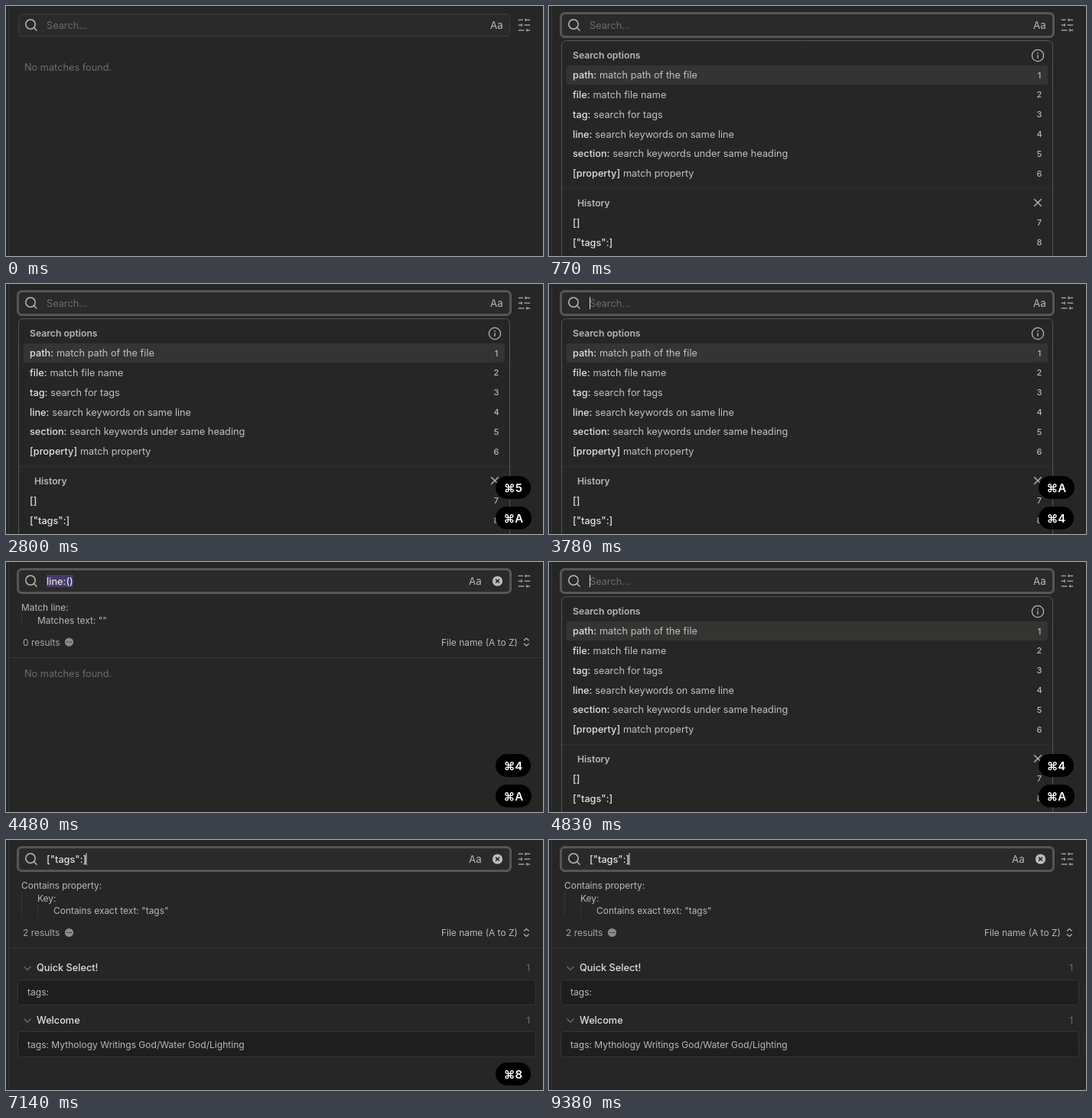
Recreate the animation shown at these times as an HTML page with a canvas. Size 702 by 328 pixels, loop 9730 ms.

```html
<!DOCTYPE html>
<html lang="en">
<head>
<meta charset="utf-8">
<title>Search panel</title>
<style>
  html, body { margin: 0; width: 100%; height: 100%; overflow: hidden; background: #262626; }
  canvas { display: block; }
</style>
</head>
<body>
<canvas id="stage" width="702" height="328"></canvas>
<script>
const ctx = document.getElementById('stage').getContext('2d');
const LOOP = 9730, TICK = 70, FADE = 185;
const BG = '#262626', LINE = '#363636', NORMAL = '#e0e0e0', MUTED = '#b8b8b8', FAINT = '#6c6c6c', RING = '#565656';
const BODY = 12.74, SMALL = 11.95;

const section = { text: 'section:()', caret: 106, explain: ['Match section:', 'Matches text: ""'] };
const line = { text: 'line:()', caret: 83, explain: ['Match line:', 'Matches text: ""'] };
const tags = {
  text: '["tags":]', caret: 105,
  explain: ['Contains property:', 'Key:', 'Contains exact text: "tags"'],
  hits: [['Quick Select!', 'tags:'], ['Welcome', 'tags: Mythology Writings God/Water God/Lighting']]
};

// at: start, menu: menu opens, clear: previous results vanish
const scenes = [
  { at: 0 },
  { at: 280, focus: true, menu: 350, blink: [770] },
  { at: 1330, focus: true, query: section, blink: [1820] },
  { at: 2030, focus: true, query: section, selected: true },
  { at: 2240, focus: true, menu: 2240, stale: section, clear: 2310, blink: [2800, 3290] },
  { at: 3850, focus: true, query: line, blink: [4340] },
  { at: 4480, focus: true, query: line, selected: true },
  { at: 4690, focus: true, menu: 4760, stale: line, clear: 4830, blink: [5250, 5740, 6300, 6790] },
  { at: 7140, focus: true, query: tags, blink: [7630, 8190, 8680, 9240] }
];

// label, time pressed, start of fade
const keys = [
  ['5', 1330, 3385], ['A', 1960, 4090], ['4', 3780, 5850], ['A', 4480, 6545], ['8', 7140, 9195]
];

const options = [
  ['path:', 'match path of the file'],
  ['file:', 'match file name'],
  ['tag:', 'search for tags'],
  ['line:', 'search keywords on same line'],
  ['section:', 'search keywords under same heading'],
  ['[property]', 'match property']
];

function setFont(size, weight) {
  ctx.font = `${weight} ${size}px Inter, "Noto Sans", sans-serif`;
}

function text(str, x, y, color = MUTED, size = BODY, weight = 400, align = 'left') {
  setFont(size, weight);
  ctx.textAlign = align;
  ctx.fillStyle = color;
  ctx.fillText(str, x, y);
  return ctx.measureText(str).width;
}

function strong(str, x, y) {
  return text(str, x, y, NORMAL, BODY, 500);
}

function box(x, y, w, h, r, fill, stroke, width = 1) {
  ctx.beginPath();
  ctx.roundRect(x, y, w, h, r);
  if (fill) { ctx.fillStyle = fill; ctx.fill(); }
  if (stroke) { ctx.strokeStyle = stroke; ctx.lineWidth = width; ctx.stroke(); }
}

function poly(color, width, ...points) {
  ctx.beginPath();
  for (let i = 0; i < points.length; i += 2) ctx.lineTo(points[i], points[i + 1]);
  ctx.strokeStyle = color;
  ctx.lineWidth = width;
  ctx.stroke();
}

function disc(x, y, r, fill, stroke, width) {
  box(x - r, y - r, 2 * r, 2 * r, r, fill, stroke, width);
}

function cross(x, y, r, color, width) {
  poly(color, width, x - r, y - r, x + r, y + r);
  poly(color, width, x + r, y - r, x - r, y + r);
}

function sliders() {
  const s = 0.85, ox = 667.3, oy = 14.8;
  const seg = (x1, y1, x2, y2) => poly(MUTED, 1.2, ox + x1 * s, oy + y1 * s, ox + x2 * s, oy + y2 * s);
  for (const [y, left, right, knob] of [[4, 10, 14, 14], [12, 8, 12, 8], [20, 12, 16, 16]]) {
    seg(3, y, left, y);
    seg(right, y, 21, y);
    seg(knob, y - 2, knob, y + 2);
  }
}

function searchBar(t, scene) {
  const { query } = scene;
  box(16.5, 10.5, 642, 29, 4, '#2a2a2a', '#3c3c3c');
  if (scene.focus) {
    ctx.globalAlpha = scene.at === 280 ? Math.min(1, 0.35 + (t - 280) / 200) : 1;
    box(15.5, 9.5, 644, 31, 5, null, RING, 3);
    ctx.globalAlpha = 1;
  }
  disc(32, 24, 6.2, null, MUTED, 1.5);
  poly(MUTED, 1.5, 36.5, 28.5, 40.5, 32.5);
  sliders();
  text('Aa', query ? 605 : 633, 30, MUTED, 13.3, 400);

  if (query) {
    if (scene.selected) {
      setFont(BODY, 500);
      ctx.fillStyle = '#463b68';
      ctx.fillRect(53, 17, ctx.measureText(query.text).width, 16);
    }
    strong(query.text, 53, 30);
    disc(642.5, 25, 6.6, '#bcbcbc');
    cross(642.5, 25, 2.4, '#2a2a2a', 1.5);
  } else {
    text('Search...', 53, 30, FAINT);
  }

  if (scene.blink && scene.blink.filter(b => b <= t).length % 2 === 0) {
    ctx.fillStyle = '#e0e0e0';
    ctx.fillRect((query ? query.caret : 53.5) - 0.5, 17, 1, 16);
  }
}

function results({ explain, hits = [] }) {
  const step = 16.5, shift = (explain.length - 2) * step;
  explain.forEach((str, i) => {
    text(str, 20 + 21 * i, 64 + step * i, MUTED, SMALL);
    if (i) poly(LINE, 1, 21 * i - 0.5, 51.5 + step * i, 21 * i - 0.5, 84 + shift);
  });

  text(`${hits.length} results`, 22, 109.5 + shift, '#a6a6a6', SMALL);
  const y = 105 + shift;
  disc(82.5, y, 5.6, '#8c8c8c');
  for (const dx of [-2.7, 0, 2.7]) disc(82.5 + dx, y, 0.8, BG);
  text('File name (A to Z)', 569, 109.5 + shift, MUTED, SMALL);
  poly(MUTED, 1.2, 677, y - 2, 680.3, y - 5, 683.6, y - 2);
  poly(MUTED, 1.2, 677, y + 2, 680.3, y + 5, 683.6, y + 2);
  const rule = Math.floor(125 + shift) + 0.5;
  poly(LINE, 1, 4, rule, 702, rule);

  if (!hits.length) text('No matches found.', 24, 151, FAINT);
  hits.forEach(([title, match], i) => {
    const top = 168 + 68.5 * i;
    poly(FAINT, 1.4, 23.5, top - 2, 28, top + 2.5, 32.5, top - 2);
    strong(title, 40, top + 4.2);
    text('1', 685, top + 4, FAINT, SMALL, 400, 'right');
    box(15.5, Math.floor(top + 15) + 0.5, 677, 33, 4, '#1e1e1e', LINE);
    text(match, 28, top + 36.3, MUTED, 12.05);
  });
}

function menu() {
  box(16.5, 45.5, 642, 300, 6, BG, RING);
  text('Search options', 31, 69, MUTED, 12.2, 600);
  disc(639, 65, 7.6, null, MUTED, 1.3);
  poly(MUTED, 1.4, 639, 64.3, 639, 68.8);
  disc(639, 61.8, 0.9, MUTED);

  const number = (n, y) => text(n, 641, y - 0.5, MUTED, 11, 500, 'center');
  box(23, 78, 629, 25, 3, '#343532');
  options.forEach(([name, hint], i) => {
    const y = 95 + 25.85 * i;
    const w = strong(name, 31, y);
    text(hint, 31 + w + 3.8, y, '#c0c0c0');
    number(i + 1, y);
  });

  poly('#303030', 1, 17, 239.5, 658, 239.5);
  text('History', 37, 262.5, MUTED, 12.2, 600);
  cross(639, 258, 4.8, MUTED, 1.3);
  ['[]', '["tags":]'].forEach((str, i) => {
    const y = 288.5 + 26 * i;
    strong(str, 31, y);
    number(i + 7, y);
  });
}

function pills(t) {
  const live = keys.filter(([, down, fade]) => t >= down && t < fade + FADE);
  live.forEach(([label, , fade], i) => {
    const y = 292 - 40 * (live.length - 1 - i);
    ctx.globalAlpha = Math.min(1, 1 - (t - fade) / FADE);
    box(640, y, label === 'A' ? 47 : 46, 30, 15, '#000');
    text('⌘' + label, label === 'A' ? 663.3 : 663, y + 20.5, '#fff', 15, 600, 'center');
    ctx.globalAlpha = 1;
  });
}

function draw(t) {
  const scene = scenes.findLast(s => s.at <= t);
  ctx.fillStyle = BG;
  ctx.fillRect(0, 0, 702, 328);
  poly(LINE, 1, 3.5, 0, 3.5, 328);
  const shown = scene.query || (t < scene.clear && scene.stale);
  if (shown) results(shown);
  else text('No matches found.', 24, 85, FAINT);
  searchBar(t, scene);
  if (t >= scene.menu) menu();
  pills(t);
}

const start = performance.now();
function frame() {
  const t = (performance.now() - start) % LOOP;
  draw(Math.floor(t / TICK) * TICK);
  requestAnimationFrame(frame);
}
frame();
</script>
</body>
</html>
```
